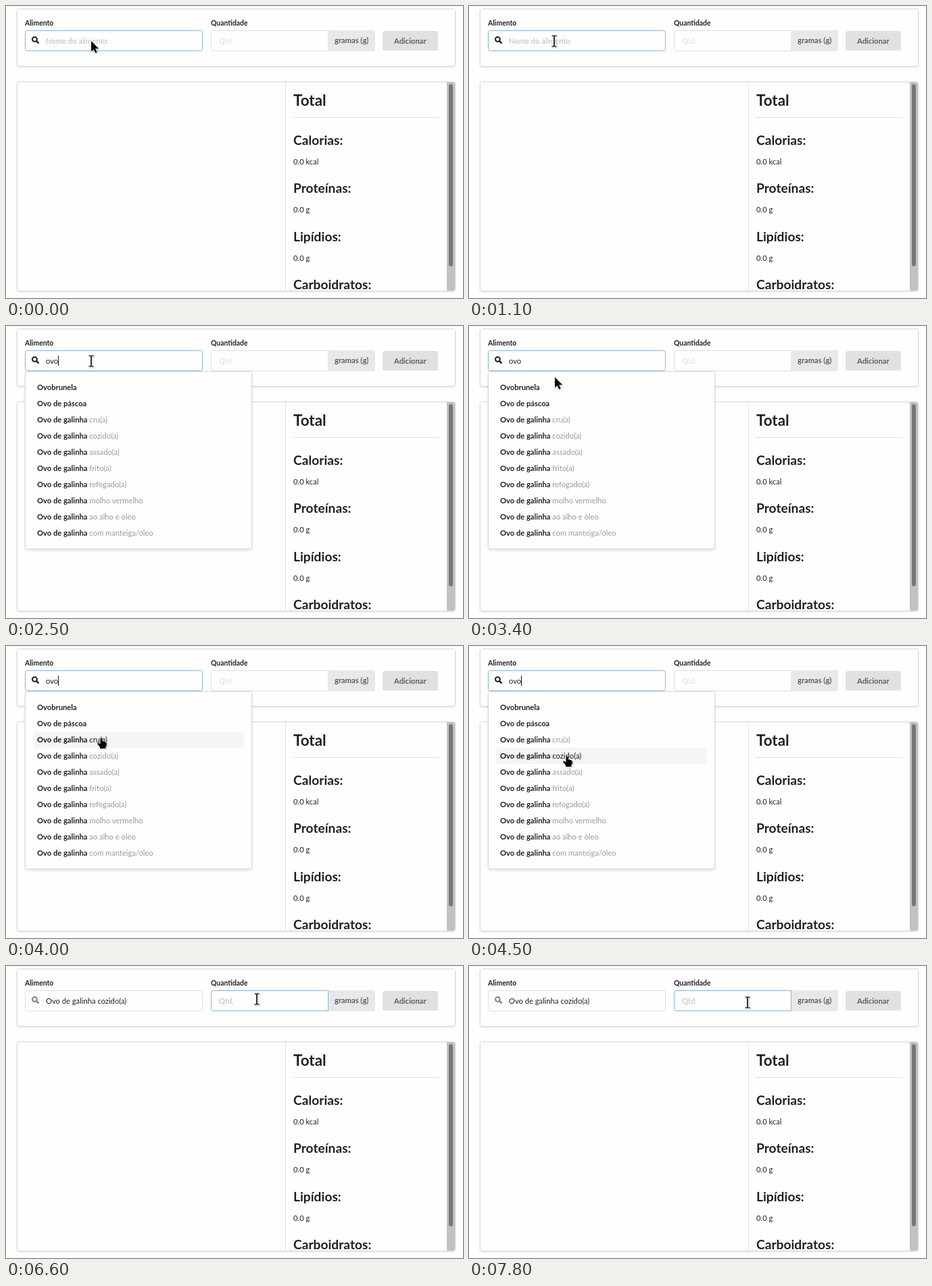
These frames come from a looping animation (676x433 px, 8000 ms). An HTML page:

```html
<!DOCTYPE html>
<html lang="pt-BR">
<head>
<meta charset="utf-8">
<title>Calculadora de alimentos</title>
<style>
  html, body { margin: 0; width: 100%; height: 100%; overflow: hidden; background: #fefefe; }
  svg { display: block; width: 676px; height: 433px; }
  text { font: 11.2px Lato, sans-serif; fill: #212122; white-space: pre; }
  .label { font-size: 10.4px; font-weight: 700; }
  .h1 { font-size: 22.4px; font-weight: 700; }
  .h2 { font-size: 19.2px; font-weight: 700; }
  .button { font-weight: 700; fill: #5c5d5e; }
  .panel, .menu { fill: #fefefe; stroke: #d8d8d9; }
  .panel { filter: drop-shadow(0 1px 1px rgba(34, 36, 38, .14)); }
  .menu { filter: drop-shadow(0 2px 2px rgba(34, 36, 38, .13)); }
  .field { fill: #fefefe; stroke: #dededf; }
  .field.focus { stroke: #85b7d9; }
  .hint { fill: #dfdfdf; }
  .hint.focus { fill: #bcbcbc; }
  .icon { fill: none; stroke: #1f1f20; stroke-width: 2; opacity: .55; }
  .icon.focus { opacity: 1; }
  .title { font-weight: 700; }
  .note { fill: #999; }
  .hover .title, .hover .note { fill: #141415; }
  .row rect { fill: none; }
  .row.hover rect { fill: #f5f5f5; }
  .pointer { fill: #060606; stroke: #fff; stroke-width: 1; stroke-linejoin: round; paint-order: stroke;
    filter: drop-shadow(1px 1px 1px rgba(0, 0, 0, .25)); }
</style>
</head>
<body>
<svg viewBox="0 0 676 433">
  <defs><clipPath id="inside"><rect x="17" y="113" width="647" height="309" rx="3"/></clipPath></defs>

  <rect class="panel" x="16.5" y="4.5" width="648" height="85" rx="3"/>
  <text class="label" x="28" y="29">Alimento</text>
  <text class="label" x="303" y="29">Quantidade</text>

  <rect class="field" id="food" x="28.5" y="36.5" width="262" height="30" rx="3"/>
  <g class="icon" id="icon"><circle cx="42.4" cy="49.4" r="3.4"/><path d="M44.9 51.9L48.4 55.4" stroke-width="2.4"/></g>
  <text class="hint" id="foodHint" x="59" y="56">Nome do alimento</text>
  <text id="value" x="59" y="56"></text>

  <path d="M477 36H543a3 3 0 0 1 3 3V64a3 3 0 0 1-3 3H477z" fill="#e8e8e8"/>
  <path class="field" id="amount" d="M476.5 36.5H306.5a3 3 0 0 0-3 3V63.5a3 3 0 0 0 3 3H476.5z"/>
  <path id="seam" d="M476.5 37V66" stroke="#e8e8e8"/>
  <text class="hint" id="amountHint" x="315" y="56">Qtd.</text>
  <text class="button" x="486" y="55">gramas (g)</text>
  <rect x="557" y="37" width="82" height="29" rx="3" fill="#e0e1e2"/>
  <text class="button" x="574" y="56">Adicionar</text>

  <rect class="panel" x="16.5" y="112.5" width="648" height="310" rx="3"/>
  <g clip-path="url(#inside)">
    <path d="M413.5 113V422" stroke="#e2e2e3"/>
    <text class="h1" x="425" y="148">Total</text>
    <path d="M425 165.5H641" stroke="#dededf"/>
    <g id="totals"></g>
    <rect x="652" y="113" width="12" height="309" fill="#c2c2c2"/>
    <rect x="655" y="116" width="6" height="270" rx="3" fill="#787878"/>
  </g>

  <g id="menu">
    <rect class="menu" x="28.5" y="67.5" width="335" height="263" rx="3"/>
  </g>
  <rect id="caret" y="44" width="1" height="15" fill="#111"/>

  <g id="pointer">
    <path class="pointer" data-kind="arrow" stroke-width="1.5" d="M0 0V15.5L3.6 12.2 6.1 17.8 8.6 16.7 6.2 11.2H11.2Z"/>
    <path class="pointer" data-kind="beam" d="M-3.5-8.5H-1L0-8 1-8.5H3.5V-7.2H.8V7.2H3.5V8.5H1L0 8-1 8.5H-3.5V7.2H-.8V-7.2H-3.5Z"/>
    <path class="pointer" data-kind="hand" d="M-1.5 1Q-1.5-.8 0-.8T1.6 1V4.4Q3.4 3.6 4 5 5.6 4.4 6 5.8 7.8 5.4 7.8 7.4V10.4L6.4 12.6V15H-2V12.8L-5.4 8.8Q-6.2 7-4.6 6.6-3.4 6.6-1.5 8.6Z"/>
  </g>
</svg>
<script>
const LOOP = 8000, TICK = 100;
const $ = id => document.getElementById(id);

function add(parent, tag, attrs, text = '') {
  const el = document.createElementNS('http://www.w3.org/2000/svg', tag);
  for (const key in attrs) el.setAttribute(key, attrs[key]);
  el.textContent = text;
  return parent.appendChild(el);
}

[['Calorias:', '0.0 kcal', 206], ['Proteínas:', '0.0 g', 277],
 ['Lipídios:', '0.0 g', 349], ['Carboidratos:', '0.0 g', 420]].forEach(([name, amount, y]) => {
  add($('totals'), 'text', { class: 'h2', x: 425, y }, name);
  add($('totals'), 'text', { x: 425, y: y + 29 }, amount);
});

// Suggestions for each query
const kinds = (name, ...notes) => notes.map(note => [name, note]);
const egg = kinds('Ovo de galinha', 'cru(a)', 'cozido(a)', 'assado(a)', 'frito(a)', 'refogado(a)',
  'molho vermelho', 'ao alho e óleo', 'com manteiga/óleo');
const roe = kinds('Ovas de peixe (qualquer espécie)', 'assado(a)', 'cozido(a)', 'frito(a)');
const sweets = [['Ovobrunela', ''], ['Ovo de páscoa', '']];
const results = {
  o: [['Orégano', ''], ...sweets, ['Orelha suína fresca', 'cozido(a)'],
    ...kinds('Ossada não especificada', 'cozido(a)', 'refogado(a)', 'sopa', ''),
    ['Ostra', 'cozido(a)'], roe[0]],
  ov: [...sweets, ...roe, ...egg.slice(0, 5)],
  ovo: [...sweets, ...egg]
};

const rows = Array.from({ length: 10 }, (_, i) => {
  const g = add($('menu'), 'g', { class: 'row' });
  add(g, 'rect', { x: 40, y: 79 + 24 * i, width: 312, height: 24, rx: 4 });
  const line = add(g, 'text', { x: 46, y: 95 + 24 * i });
  return { g, title: add(line, 'tspan', { class: 'title' }), note: add(line, 'tspan', { class: 'note' }) };
});

// Each track holds [time, value...]; a value lasts until the next entry
const typed = [[0, ''], [1600, 'o'], [1700, 'ov'], [2500, 'ovo'], [4900, 'Ovo de galinha cozido(a)']];
const query = [[0, ''], [1600, 'o'], [1800, 'ov'], [2500, 'ovo'], [5000, '']];
const focus = [[0, 'food'], [4900, ''], [5600, 'amount']];
const blink = [[0, 0], [400, 1], [600, 0], [1600, 1], [3000, 0], [3500, 1], [4200, 0], [4500, 1],
  [4900, 0], [5600, 1], [6600, 0], [7400, 1], [7800, 0]];
const pointer = [
  [0, 'arrow', 126, 52], [200, 'beam', 126, 52], [900, 'arrow', 126, 52], [1100, 'beam', 126, 52],
  [3200, 'beam', 126, 56], [3300, 'arrow', 126, 67], [3400, 'arrow', 127, 76], [3500, 'hand', 133, 98],
  [3700, 'hand', 134, 107], [3800, 'hand', 136, 118], [3900, 'hand', 139, 129], [4000, 'hand', 141, 137],
  [4200, 'hand', 142, 145], [4300, 'hand', 143, 153], [4400, 'hand', 144, 160], [4500, 'hand', 145, 164],
  [5000, 'arrow', 144, 164], [5100, 'arrow', 190, 140], [5200, 'arrow', 290, 85], [5300, 'beam', 360, 52],
  [5500, 'beam', 371, 49], [7000, 'beam', 398, 49], [7100, 'beam', 445, 50], [7200, 'beam', 475, 50],
  [7400, 'beam', 462, 51], [7500, 'beam', 430, 53], [7600, 'beam', 412, 54]
];
const at = (track, t) => track.findLast(entry => entry[0] <= t).slice(1);
const show = (el, on) => { el.style.display = on ? '' : 'none'; };

function drawMenu(text, kind, y) {
  show($('menu'), text);
  if (!text) return;
  const hovered = kind === 'hand' ? Math.floor((y - 79) / 24) : -1;
  rows.forEach(({ g, title, note }, i) => {
    const [name, extra] = results[text][i];
    title.textContent = name;
    note.textContent = extra && ' ' + extra;
    g.classList.toggle('hover', i === hovered);
  });
}

function draw(t) {
  const [value] = at(typed, t), [active] = at(focus, t), [kind, x, y] = at(pointer, t);
  const onFood = active === 'food', onAmount = active === 'amount';

  $('value').textContent = value;
  show($('foodHint'), !value);
  for (const id of ['food', 'icon', 'foodHint']) $(id).classList.toggle('focus', onFood);
  for (const id of ['amount', 'amountHint']) $(id).classList.toggle('focus', onAmount);
  show($('seam'), !onAmount);

  const caretX = onAmount ? 315 : 59 + (value ? $('value').getComputedTextLength() : 0);
  $('caret').setAttribute('x', Math.floor(caretX));
  show($('caret'), active && at(blink, t)[0]);

  drawMenu(at(query, t)[0], kind, y);
  $('pointer').setAttribute('transform', `translate(${x} ${y})`);
  for (const shape of $('pointer').children) show(shape, shape.dataset.kind === kind);
}

const start = performance.now();
let last = -1;
function loop() {
  const t = Math.floor((performance.now() - start) % LOOP / TICK) * TICK;
  if (t !== last) draw(last = t);
  requestAnimationFrame(loop);
}
loop();
</script>
</body>
</html>
```
